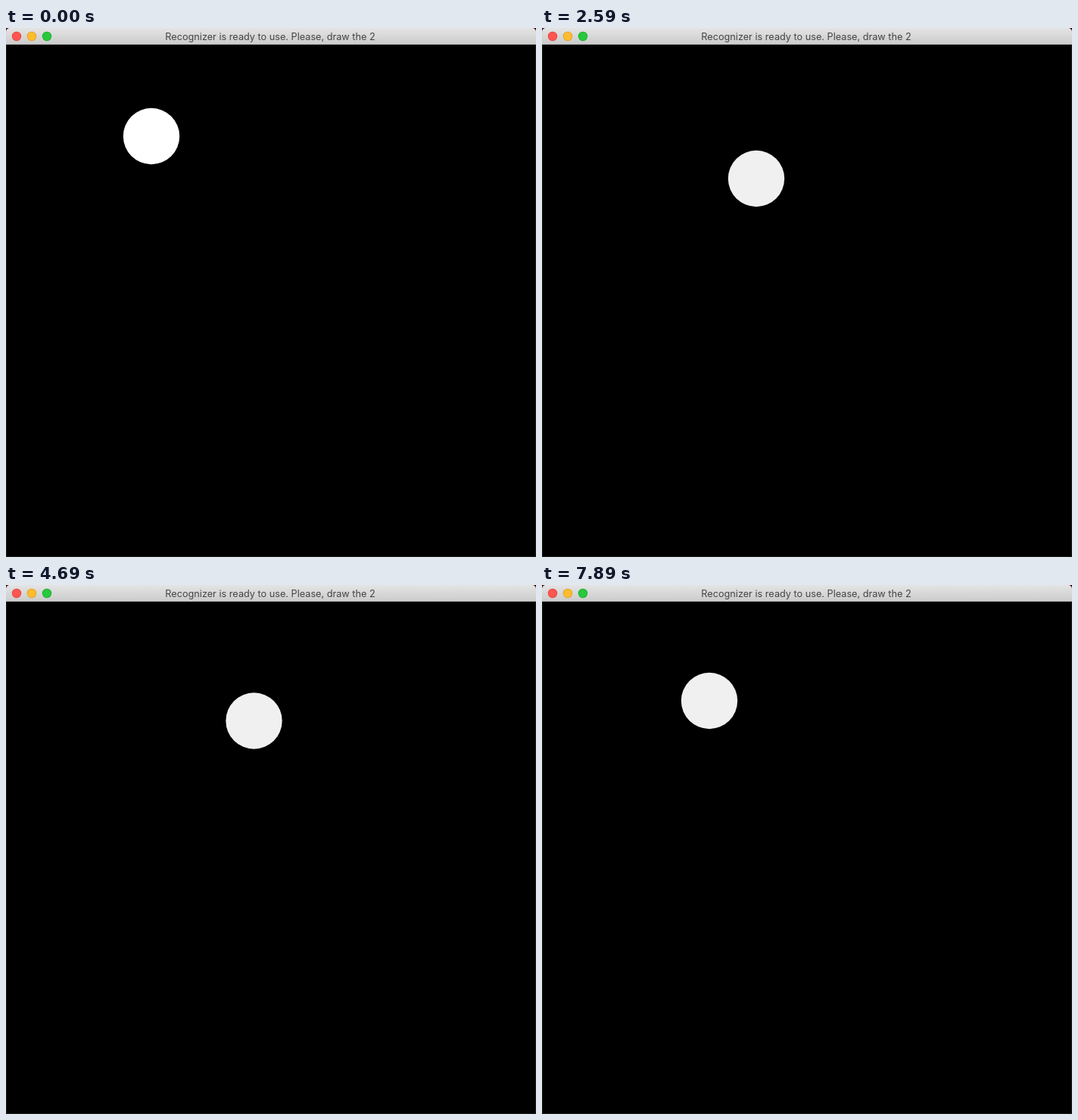
Recreate the animation shown at these times as an HTML page with a canvas. Size 700 px wide and 699 px high, loop 7.99 s.

```html
<!DOCTYPE html>
<html lang="en">
<head>
<meta charset="utf-8">
<title>Digit recognizer</title>
<style>
  html, body { margin: 0; width: 100%; height: 100%; overflow: hidden; background: #000; }
  canvas { display: block; }
</style>
</head>
<body>
<canvas id="stage" width="700" height="699"></canvas>
<script>
const ctx = document.getElementById('stage').getContext('2d');
const W = 700, H = 699, BAR = 22, CELL = 25, RADIUS = 37.2;
const LOOP = 7990, STEP = 100;

const MODES = {
  ready: { back: '#000', cursor: '#fff', clears: true },
  move:  { back: '#000', cursor: '#f0f0f0', clears: true },
  draw:  { back: '#000', cursor: '#fff' },
  right: { back: '#0f0', cursor: '#ff0' },
  wrong: { back: '#f00', cursor: '#f0f' }
};

// Start time, mode, cursor path in grid cells; "|" separates steps of 100 ms.
const SCRIPT = [
  [0, 'ready', '7.18,4.34'],
  [90, 'draw', '7.18,4.34 | 7.1,3.9 | 7.1,3.3 | 7.4,3 | 8.3,2.9 | 9.34,2.9'],
  [790, 'draw', '11,3 | 12,4 13,5 13,8 | 13,11 12,13 12,15 | 11,16 11,17 9,18 8,19 7,19.34 | ' +
    '6,19 5,18 5,16 | 6,16 6,15 10,15 | 11,15 13,17 13,18 14,19 | 17,19 17.48,17.62'],
  [1590, 'right', '17.48,17.62'],
  [2190, 'right', '17.14,17.62'],
  [2390, 'move', '15.6,15 | 13,10.6 | 10.82,6.58'],
  [2790, 'move', '10.2,5.8 | 9.5,4.9 | 9,4'],
  [3190, 'draw', '9,4 10.4,4 | 13,4 13,6 | 13,9 12,10 11,10 10,11 | 11,11 12,10 15,10 | ' +
    '15,11 16,12 16,14 | 15,15 15,16 14,16 14,17 12,17 | 10,17 8.9,16.18'],
  [3890, 'wrong', '8.9,16.18'],
  [4190, 'move', '10,12 | 11.5,7.7'],
  [4590, 'move', '12,6.8 | 12.6,5.8 | 13,4.8 | 13.1,3.8 | 13.1,3.1'],
  [5190, 'draw', '13,3 11.14,3.1 | 9,3 9,4 8,5 7,6 | 7,9 8,9 8,10 | 11.98,10.02 | ' +
    '13,9 13.02,3.62 | 13.46,6.82 | 14,8 14,15 13.02,16.42'],
  [5890, 'wrong', '13.02,16.42'],
  [6090, 'move', '10.5,17.8 | 7.22,19.3'],
  [6590, 'move', '7.86,15.78'],
  [6890, 'move', '8.1,13.4 | 8.5,11 | 8.9,8.6 | 9.1,6.8'],
  [7390, 'move', '9.1,6.6 | 9.1,6.3 | 9.1,6.1'],
  [7790, 'move', '8.8,5.5 | 8.34,4.74']
];

const steps = SCRIPT.flatMap(([start, mode, path]) =>
  path.split(' | ').map((part, i) => ({
    time: start + i * STEP,
    mode: MODES[mode],
    inks: mode === 'draw',
    points: part.split(' ').map(p => p.split(',').map(Number))
  })));

// Cells from a to b: straight runs are filled in, diagonal jumps are not.
function cellsBetween(a, b) {
  const dx = b[0] - a[0], dy = b[1] - a[1];
  if (dx && dy) return [b];
  const n = Math.max(Math.abs(dx), Math.abs(dy));
  return Array.from({ length: n }, (_, i) => [a[0] + dx * (i + 1) / n, a[1] + dy * (i + 1) / n]);
}

function stateAt(time) {
  let ink = [], last = null, current;
  for (const step of steps) {
    if (step.time > time) break;
    current = step;
    if (step.mode.clears) { ink = []; last = null; }
    if (!step.inks) continue;
    for (const point of step.points) {
      const cell = point.map(Math.round);
      ink.push(...(last ? cellsBetween(last, cell) : [cell]));
      last = cell;
    }
  }
  return { ink, mode: current.mode, cursor: current.points.at(-1) };
}

function disc(x, y, r, color) {
  ctx.fillStyle = color;
  ctx.beginPath();
  ctx.arc(x, y, r, 0, 2 * Math.PI);
  ctx.fill();
}

function drawTitleBar() {
  ctx.fillStyle = '#3a0c10';
  ctx.fillRect(0, 0, W, BAR);
  const shade = ctx.createLinearGradient(0, 0, 0, BAR);
  shade.addColorStop(0, '#e4e4e4');
  shade.addColorStop(1, '#cbcbcb');
  ctx.fillStyle = shade;
  ctx.beginPath();
  ctx.roundRect(0, 0, W, BAR, [5, 5, 0, 0]);
  ctx.fill();
  ctx.fillStyle = '#b4b4b4';
  ctx.fillRect(0, BAR - 1, W, 1);

  [['#e2443f', '#fe5650'], ['#dfa023', '#fdbc2e'], ['#1dab2c', '#28c83c']].forEach(([rim, fill], i) => {
    disc(14 + 20 * i, 11, 6.2, rim);
    disc(14 + 20 * i, 11, 5.4, fill);
  });

  ctx.fillStyle = '#444';
  ctx.font = '12.7px Inter, Roboto, sans-serif';
  ctx.textAlign = 'center';
  ctx.fillText('Recognizer is ready to use. Please, draw the 2', 349, 16);
}

function draw(time) {
  const { ink, mode, cursor } = stateAt(time);
  ctx.fillStyle = mode.back;
  ctx.fillRect(0, 0, W, H);
  if (mode.back === '#000') {
    ctx.strokeStyle = '#1c1c1c';
    ctx.strokeRect(0.5, BAR - 0.5, W - 1, H - BAR);
  }
  ctx.fillStyle = '#fff';
  for (const [col, row] of ink) {
    ctx.fillRect((col - 1) * CELL, BAR + (row - 1) * CELL, 3 * CELL, 3 * CELL);
  }
  disc((cursor[0] + 0.5) * CELL, BAR + (cursor[1] + 0.5) * CELL, RADIUS, mode.cursor);
  drawTitleBar();
}

const begin = performance.now();
function tick() {
  draw((performance.now() - begin) % LOOP);
  requestAnimationFrame(tick);
}
tick();
</script>
</body>
</html>
```
